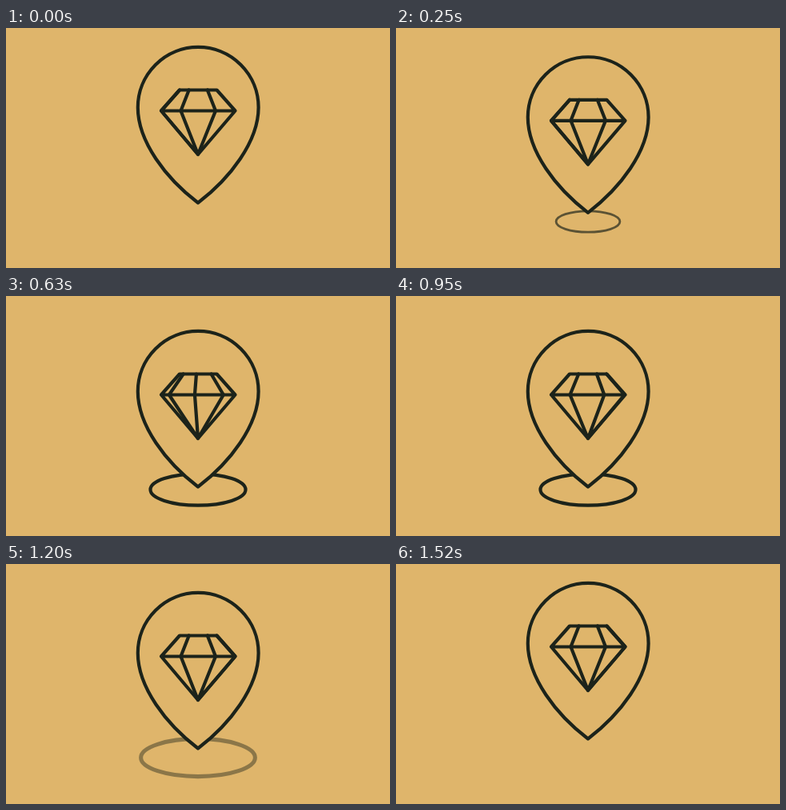
Write an HTML page that moves like this. It is 480x300 px and loops after 1.55 s.

```html
<!DOCTYPE html>
<html lang="en">
<head>
<meta charset="utf-8">
<title>Diamond pin</title>
<style>
  html, body { margin: 0; width: 100%; height: 100%; overflow: hidden; background: #dfb56b; }
  svg { display: block; width: 100vw; height: 100vh; }
</style>
</head>
<body>
<svg viewBox="0 0 480 300" fill="none" stroke="#1c231a" stroke-width="4.2" stroke-linejoin="round" stroke-linecap="round">
  <ellipse id="ring" rx="59.5" ry="19.7"/>
  <g id="pin">
    <path fill="#dfb56b" d="M240 218.5C200 188 164.8 142 164.8 99.3A75.4 75.4 0 0 1 315.6 99.3C315.6 142 280 188 240 218.5Z"/>
    <path d="M217 77.5H263.5L286.5 103.5L240 158L194 103.5ZM194 103.5H286.5"/>
    <path id="facets"/>
  </g>
</svg>
<script>
const LOOP = 1550;
const [ring, pin, facets] = ['ring', 'pin', 'facets'].map(id => document.getElementById(id));

// Each facet edge travels to the place of its right-hand neighbour.
const topX = [217, 228.7, 251.8, 263.5];
const girdleX = [194, 218.5, 262, 286.5];

const mix = (a, b, p) => a + (b - a) * p;
function ease(t, start, end) {
  const x = Math.min(1, Math.max(0, (t - start) / (end - start)));
  return x * x * (3 - 2 * x);
}

// Cadence: five poses every 190 ms, the third one held longer.
function snap(t) {
  const phase = t % 190;
  return t - phase + [160, 130, 60, 30, 0].find(s => s <= phase);
}

function draw(t) {
  const drop = ease(t, 0, 433) - ease(t, 955, 1521);
  pin.setAttribute('transform', `translate(0 ${20 * drop})`);

  const grow = ease(t, 0, 406), fade = ease(t, 950, 1407);
  ring.setAttribute('transform', `translate(240 242) scale(${grow + 0.35 * fade})`);
  ring.setAttribute('opacity', grow * (1 - fade));

  const turn = ease(t, 320, 1035);
  facets.setAttribute('d', [0, 1, 2].map(i => {
    const upper = mix(topX[i], topX[i + 1], turn);
    const lower = mix(girdleX[i], girdleX[i + 1], turn);
    return `M${upper} 77.5L${lower} 103.5L240 158`;
  }).join(''));
}

const begin = performance.now();
function tick() {
  draw(snap((performance.now() - begin) % LOOP));
  requestAnimationFrame(tick);
}
tick();
</script>
</body>
</html>
```
